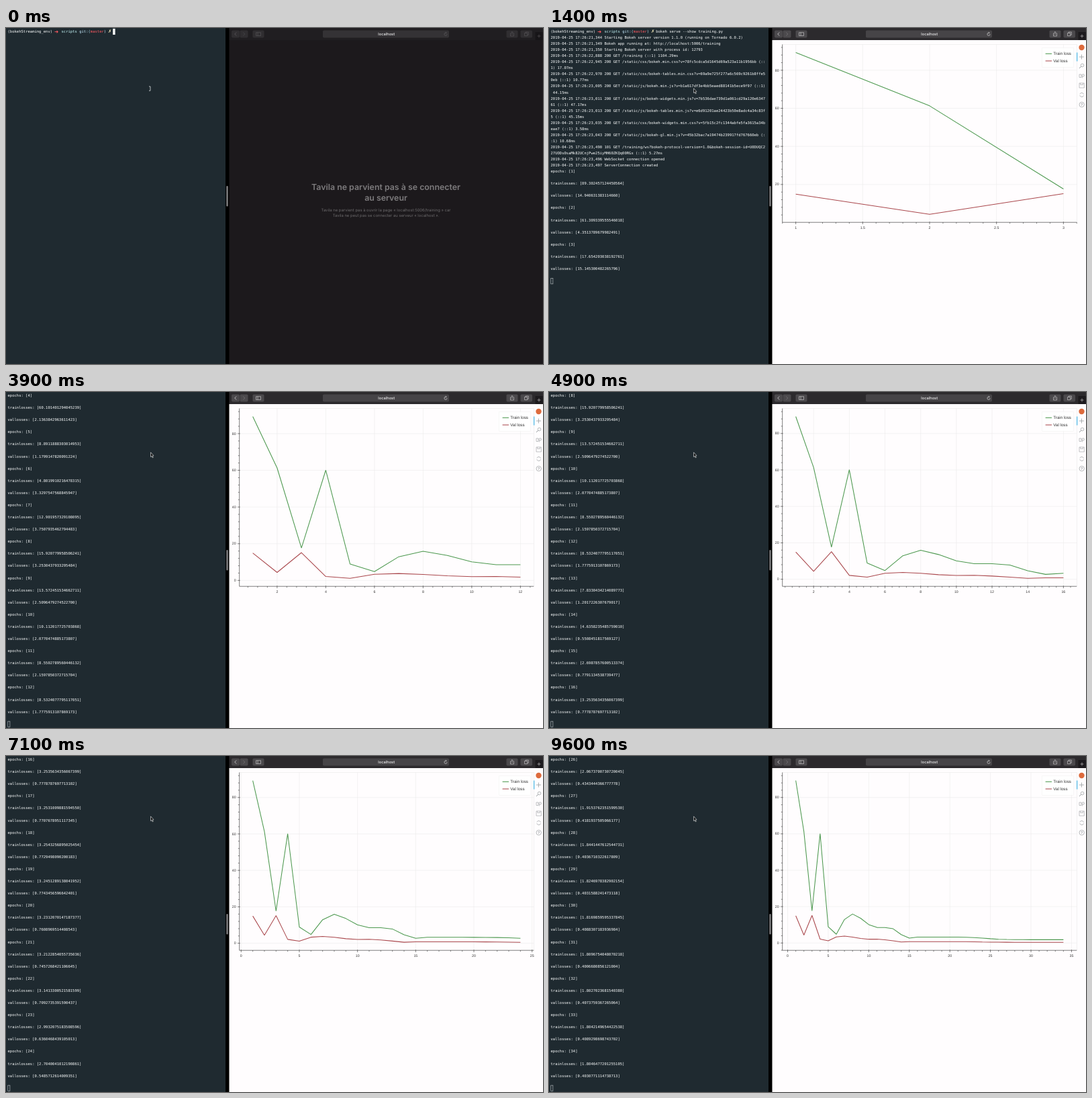
Animation of 800x500 px, one loop 9700 ms. Source, as an HTML page with a canvas:

```html
<!DOCTYPE html>
<html lang="en">
<head>
<meta charset="utf-8">
<title>Streaming training losses</title>
<style>
html, body { margin: 0; width: 100%; height: 100%; overflow: hidden; background: #000; }
canvas { display: block; width: 800px; height: 500px; }
</style>
</head>
<body>
<canvas id="stage" width="800" height="500"></canvas>
<script>
const ctx = document.getElementById('stage').getContext('2d');
const LOOP = 9700, STEP = 100, EPOCHS = 34;
const MONO = '"DejaVu Sans Mono", monospace', SIGNS = '"DejaVu Sans", sans-serif';
const UI = 'Inter, sans-serif', ARIAL = '"Liberation Sans", Arial, sans-serif';
const GREEN = '#4c984e', RED = '#aa484d';

// Cues in ms; afterwards epochs finish at a constant rate
const SERVER = 300, BROWSER = 400, CONNECTED = 600, FIRST_EPOCH = 696, EPOCH_TIME = 267.4;
const epochsAt = t => Math.max(0, Math.floor((t - FIRST_EPOCH) / EPOCH_TIME + 1));

// The losses start rough, then settle along a smooth step
const settle = (n, from, to, middle) => to + (from - to) / (1 + Math.exp(n - middle));
const losses = (rough, ...curve) =>
  Array.from({ length: EPOCHS }, (_, i) => rough[i] ?? settle(i + 1, ...curve));
const train = losses([89.3, 61.3, 17.65, 60.1, 8.89, 4.8, 12.9, 15.92, 13.57, 10.11, 8.55, 8.53, 7.83, 4.63, 2.69], 3.25, 1.8, 24.5);
const val = losses([14.94, 4.35, 15.14, 2.13, 1.17, 3.32, 3.75, 3.25, 2.5, 2.07, 2.15, 1.77, 1.2, 0.55], 0.77, 0.4, 23.5);

// Prints a loss with seeded trailing digits, as a full-precision float
function longFloat(value, seed) {
  let str = value.toFixed(2);
  for (let i = 1; str.length < 18; i++) {
    const noise = Math.abs(Math.sin(seed * 78.233 + i * 12.9898)) * 43758.5453;
    str += Math.floor(noise % 1 * 10);
  }
  return str;
}

const command = 'bokeh serve --show training.py';
const COLS = 96, ROWS = 55, ROW_H = 9.05, CHAR_W = 10 / 3;
const log = `21,344 Starting Bokeh server version 1.1.0 (running on Tornado 6.0.2)
21,349 Bokeh app running at: http://localhost:5006/training
21,350 Starting Bokeh server with process id: 12793
22,888 200 GET /training (::1) 1104.29ms
22,945 200 GET /static/css/bokeh.min.css?v=78fc5cdca5d1645d69a523a11b1956bb (::1) 17.07ms
22,970 200 GET /static/css/bokeh-tables.min.css?v=69a9e725f277a6c569c9261b8ffe50eb (::1) 10.77ms
23,005 200 GET /static/js/bokeh.min.js?v=b1a617df3e4bb5eaed88141b5ece9f97 (::1) 44.15ms
23,011 200 GET /static/js/bokeh-widgets.min.js?v=7b536dae739d1a061cd29a120e634761 (::1) 47.17ms
23,013 200 GET /static/js/bokeh-tables.min.js?v=e6d91201ae24423b50e8adc4a34c83f5 (::1) 45.15ms
23,035 200 GET /static/css/bokeh-widgets.min.css?v=5fb15c2fc1344abfe5fa3615a34beae7 (::1) 3.58ms
23,043 200 GET /static/js/bokeh-gl.min.js?v=45b32bac7a19474b239917fd767660eb (::1) 10.68ms
23,490 101 GET /training/ws?bokeh-protocol-version=1.0&bokeh-session-id=U0DUQC227UODs0saMk82UCnjPwe25iyMH60ZKQq00RGx (::1) 5.27ms
23,496 WebSocket connection opened
23,497 ServerConnection created`.split('\n')
  .flatMap(line => ('2019-04-25 17:26:' + line).match(new RegExp(`.{1,${COLS}}`, 'g')));

function rect(x, y, w, h, color, radius = 0) {
  ctx.fillStyle = color;
  ctx.beginPath();
  ctx.roundRect(x, y, w, h, radius);
  ctx.fill();
}
function stroke(shape, color, width = 0.6) {
  ctx.strokeStyle = color;
  ctx.lineWidth = width;
  ctx.stroke(new Path2D(shape));
}
const line = (x1, y1, x2, y2, color, width) => stroke(`M${x1} ${y1}L${x2} ${y2}`, color, width);
function box(x, y, w, h, color, width = 0.6) {
  ctx.strokeStyle = color;
  ctx.lineWidth = width;
  ctx.strokeRect(x, y, w, h);
}
function ring(x, y, r, color, from = 0, to = 2 * Math.PI) {
  ctx.strokeStyle = color;
  ctx.lineWidth = 0.7;
  ctx.beginPath();
  ctx.arc(x, y, r, from, to);
  ctx.stroke();
}
// Small type is laid out four times larger so that its advance widths stay exact
function text(str, x, y, size, color, family = ARIAL, align = 'left', weight = 400) {
  ctx.save();
  ctx.translate(x, y);
  ctx.scale(0.25, 0.25);
  ctx.font = `${weight} ${size * 4}px ${family}`;
  ctx.textRendering = 'geometricPrecision';
  ctx.textAlign = align;
  ctx.textBaseline = 'middle';
  ctx.fillStyle = color;
  ctx.fillText(str, 0, 0);
  ctx.restore();
}

function drawTerminal(t, n) {
  rect(0, 0, 327, 500, '#1f2a30');
  const lines = [''];
  if (t >= SERVER) lines.push(...log.slice(0, t < CONNECTED ? 3 : log.length));
  for (let i = 0; i < n; i++)
    lines.push(`epochs: [${i + 1}]`, '', `trainlosses: [${longFloat(train[i], i + 1)}]`, '',
      `vallosses: [${longFloat(val[i], i + 101)}]`, '');
  const first = Math.max(0, lines.length + 1 - ROWS);
  const rowY = row => 5.6 + (row - first) * ROW_H;
  const put = (str, col, row, color = '#fbfdfd') =>
    text(str, 2.5 + col * CHAR_W, rowY(row), 5.537, color, MONO);

  lines.forEach((str, row) => { if (row >= first && str) put(str, 0, row); });
  const typed = command.slice(0, t / STEP * 15);
  if (first === 0) {
    put('(bokehStreaming_env)', 0, 0);
    text('➜', 72, 5.6, 7.5, '#ff5a62', SIGNS);
    put('scripts', 24, 0, '#c9fbfd');
    put('git:(', 32, 0, '#c4e8fb');
    put('master', 37, 0, '#ff5a62');
    put(')', 43, 0, '#c4e8fb');
    text('✗', 152, 5.6, 6.5, '#fff3bf', SIGNS);
    put(typed, 47, 0);
  }
  if (t < SERVER) rect(2.5 + (47 + typed.length) * CHAR_W, 1, 3.5, 9, '#f4f6f6');
  else box(2.8, rowY(lines.length) - 4.2, 3.1, 8.4, '#c3c9cb');
}

function drawToolbar(active) {
  const button = active ? '#4b494c' : '#302e31', ink = active ? '#d5d4d6' : '#5c5a5d';
  rect(332.5, 0, 467.5, 18, active ? '#2c2a2d' : '#201e21');
  [[336, 12], [348.5, 12], [367.5, 17], [745.5, 17], [766.5, 17.5]]
    .forEach(([x, w]) => rect(x, 3.5, w, 11, button, 1.8));
  rect(472, 3.5, 188, 11, active ? '#464447' : '#343235', 1.8);
  stroke('M343.2 6.5l-2.5 2.5l2.5 2.5', ink, 0.8);
  stroke('M353.3 6.5l2.5 2.5l-2.5 2.5', active ? '#777578' : '#4a484b', 0.8);
  stroke('M372.5 6.7h7v4.8h-7zM375 6.7v4.8', ink);
  stroke('M752.5 7.8h-1v4.2h5v-4.2h-1M754 10v-4.4m-1.3 1.2l1.3-1.3l1.3 1.3', ink);
  stroke('M772.5 7.5h4.2v4.2h-4.2zM774 7.5v-1.5h4.3v4.3h-1.6', ink);
  ring(655, 9.2, 2.1, ink, 0, 5.2);
  stroke('M654.8 6l1.6 1.2l-1.5 1.1', ink);
  text('localhost', 566.7, 9.2, 5.7, '#eeeeef', UI, 'center', 500);
  rect(788.5, 6, 11.5, 12, active ? '#1c1a1d' : '#171518');
  stroke('M791.5 12h5m-2.5-2.5v5', ink);
}

function drawErrorPage() {
  rect(332.5, 18, 467.5, 482, '#1c191c');
  const say = (str, y, size, color, weight) => text(str, 566, y, size, color, UI, 'center', weight);
  say('Tavila ne parvient pas à se connecter', 237.5, 12.35, '#7d7b7d', 600);
  say('au serveur', 253.5, 12.35, '#7d7b7d', 600);
  say('Tavila ne parvient pas à ouvrir la page « localhost:5006/training » car', 271.3, 5.9, '#6c6a6c');
  say('Tavila ne peut pas se connecter au serveur « localhost ».', 279.6, 5.9, '#6c6a6c');
}

function drawPlotTools() {
  const ink = '#989da0';
  rect(789.3, 24.8, 8.4, 8.4, '#dd6a3c', 4.2);
  rect(786.2, 36.5, 1, 13, '#26aae1');
  stroke('M790 43h7m-3.5-3.5v7', ink, 0.8);
  ring(794.5, 55.5, 2.3, ink);
  stroke('M792.8 57.2l-2.8 2.8', ink, 1);
  stroke('M790 69h3v4.5h-3zM794.4 71.8v2.7', ink);
  ring(795.7, 70.5, 1.7, ink);
  stroke('M790 82h7.3v7h-7.3zM791.8 82v2.5h3.7v-2.5', ink);
  ring(793.7, 99.5, 3, ink, 0.3, 2.9);
  ring(793.7, 99.5, 3, ink, 3.5, 6);
  ring(793.7, 114, 3.7, ink);
  text('?', 793.7, 114.2, 5.6, ink, ARIAL, 'center', 700);
}

const PX = 0.4762; // one screen pixel on the stage
const left = 347.7, right = 786.3, top_ = 24.5, bottom = 289.2;

function padded(low, high) {
  const pad = high > low ? (high - low) * 0.05 : 1;
  return [low - pad, high + pad];
}
function ticks([low, high]) {
  const base = 10 ** Math.floor(Math.log10((high - low) / 6));
  const miss = step => Math.abs(6 - (high - low) / step);
  const step = [1, 2, 5, 10].map(m => m * base).reduce((a, b) => miss(b) < miss(a) ? b : a);
  const list = [];
  for (let i = Math.ceil(low / step * 5); i <= high / step * 5; i++)
    list.push({ value: i * step / 5, inside: i % 5 ? 0 : 2 * PX, outside: (i % 5 ? 4 : 6) * PX, major: i % 5 === 0 });
  return list;
}

function drawChart(n) {
  const grid = '#e6e6e6', ink = '#333';
  box(left, top_, right - left, bottom - top_, grid, 0.5);
  if (n) {
    const a = train.slice(0, n), b = val.slice(0, n);
    const xr = padded(1, n), yr = padded(Math.min(...a, ...b), Math.max(...a, ...b));
    const toX = v => left + (v - xr[0]) / (xr[1] - xr[0]) * (right - left);
    const toY = v => bottom - (v - yr[0]) / (yr[1] - yr[0]) * (bottom - top_);
    const label = v => String(+v.toFixed(2));
    ticks(xr).forEach(({ value, inside, outside, major }) => {
      const x = toX(value);
      if (major) {
        line(x, top_, x, bottom, grid, 0.5);
        text(label(value), x, 297.2, 5.24, '#333', ARIAL, 'center');
      }
      line(x, bottom - inside, x, bottom + outside, ink);
    });
    ticks(yr).forEach(({ value, inside, outside, major }) => {
      const y = toY(value);
      if (major) {
        line(left, y, right, y, grid, 0.5);
        text(label(value), 342.6, y + 0.2, 5.24, '#333', ARIAL, 'right');
      }
      line(left + inside, y, left - outside, y, ink);
    });
    ctx.lineJoin = 'bevel';
    const curve = (data, color) =>
      stroke('M' + data.map((v, i) => `${toX(i + 1)} ${toY(v)}`).join('L'), color, 1.05);
    curve(a, GREEN);
    curve(b, RED);
    ctx.lineJoin = 'miter';
  }
  stroke(`M${left} ${top_}V${bottom}H${right}`, ink);
  rect(734.8, 29.3, 46.8, 29, 'rgba(255,255,255,.95)');
  box(734.8, 29.3, 46.8, 29, '#f0f0f0', 0.5);
  [['Train loss', 38.3, GREEN], ['Val loss', 49, RED]].forEach(([name, y, color]) => {
    line(739.6, y, 749, y, color, 1.05);
    text(name, 751.3, y + 0.1, 6.19, '#333');
  });
}

function drawPointer(arrow) {
  if (!arrow) return stroke('M213 87h2v6.3h-2', '#d5d9da', 0.8);
  const shape = 'M215.6 89.8v6.8l1.5-1.3l1.1 2.5l1.1-.5l-1.1-2.4l1.8-.2z';
  ctx.fillStyle = '#0b0b0b';
  ctx.fill(new Path2D(shape));
  stroke(shape, '#dcdfe0', 0.7);
}

function draw(t) {
  const n = epochsAt(t), open = t >= BROWSER;
  rect(0, 0, 800, 500, '#000');
  drawTerminal(t, n);
  rect(328.4, 235, 2.2, 30.5, '#8d8d8f', 1.1);
  if (open) rect(332.5, 18, 467.5, 482, '#fffdfe');
  else drawErrorPage();
  if (t >= CONNECTED) {
    drawChart(n);
    drawPlotTools();
  }
  drawToolbar(open);
  drawPointer(open);
}

const start = performance.now();
function tick() {
  const t = (performance.now() - start) % LOOP;
  draw(Math.floor(t / STEP) * STEP);
  requestAnimationFrame(tick);
}
tick();
</script>
</body>
</html>
```
